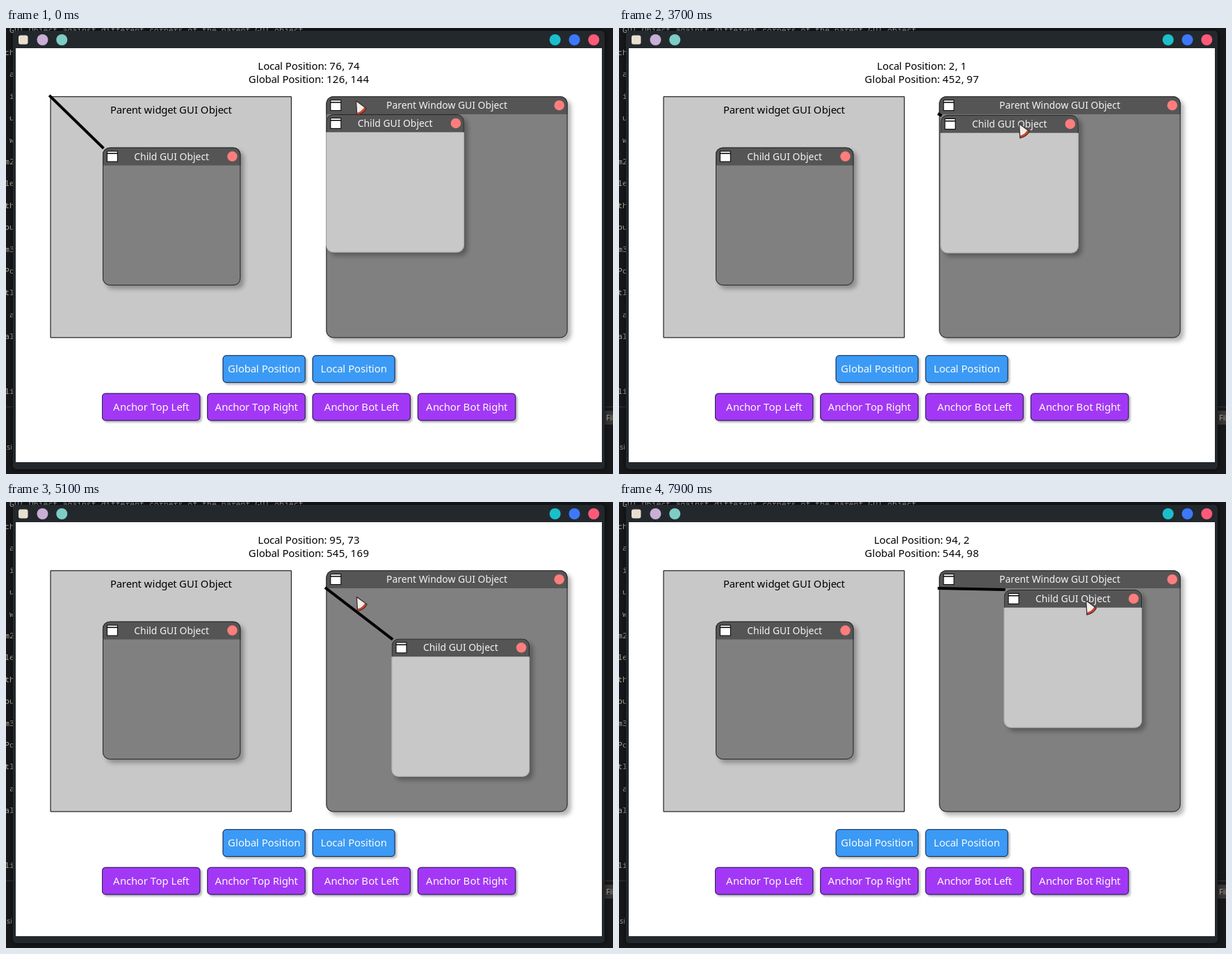
Write an HTML page with a canvas that moves like this. It is 873 px wide and 641 px high and loops after 8000 ms.

```html
<!DOCTYPE html>
<html lang="en">
<head>
<meta charset="utf-8">
<title>Local and global positions</title>
<style>
  html, body { margin: 0; width: 100%; height: 100%; overflow: hidden; background: #17191b; }
  canvas { display: block; }
</style>
</head>
<body>
<canvas id="stage" width="873" height="641"></canvas>
<script>
const ctx = document.getElementById('stage').getContext('2d');
const LOOP = 8000, STEP = 100;
const SCALE = 0.992, LEFT = 14, TOP = 28.8;   // app units to stage pixels
const SELECT = 2200;                          // the right child becomes the tracked one
const RESIZE_HOVER = 6500;                    // the pointer crosses the window edge
const DARK = '#242424', HEADER = '#555555', GRAY = '#808080', LIGHT = '#c8c8c8';
const SANS = '"Noto Sans", sans-serif', MONO = '"Noto Sans Mono", monospace';

const linear = (t, start, end) => Math.min(1, Math.max(0, (t - start) / (end - start)));
const ease = (t, start, end) => {
  const u = linear(t, start, end);
  return u * u * (3 - 2 * u);
};

// Two drags: diagonally into the window, then up along a slight bow.
function childAt(t) {
  const down = ease(t, 3600, 4800), up = ease(t, 7400, 7900);
  return [95 * down - up + 10 * Math.sin(Math.PI * up), 73 * down - 71 * up].map(Math.round);
}

// Free pointer moves: start, end, dx, dy, upward bow
const moves = [
  [0, 100, -9, -3, 0],
  [300, 900, 84, 35, 40],
  [1200, 1400, -5, 0, 0],
  [4750, 5200, -187, -76, 10],
  [6500, 7200, 211, 112, 0]
];

// The pointer sums its free moves, a turn around the window corner and the drags.
function pointerAt(t, [childX, childY]) {
  const from = Math.PI / 6, angle = from + linear(t, 5200, 6500) * Math.PI * 4 / 3;
  let x = 503 + childX * SCALE + 22 * (Math.cos(angle) - Math.cos(from));
  let y = 104 + childY * SCALE + 22 * (Math.sin(angle) - Math.sin(from));
  for (const [start, end, dx, dy, bow] of moves) {
    const p = ease(t, start, end);
    x += dx * p;
    y += dy * p - bow * Math.sin(Math.PI * linear(t, start, end));
  }
  return [x, y];
}

function rect(x, y, w, h, fill) {
  ctx.fillStyle = fill;
  ctx.fillRect(x, y, w, h);
}

function circle(x, y, r, fill) {
  ctx.fillStyle = fill;
  ctx.beginPath();
  ctx.arc(x, y, r, 0, 7);
  ctx.fill();
}

function rounded(x, y, w, h, radius, fill) {
  ctx.fillStyle = fill;
  ctx.beginPath();
  ctx.roundRect(x, y, w, h, radius);
  ctx.fill();
}

// One-pixel border just inside the box
function border(x, y, w, h, radius, stroke) {
  ctx.strokeStyle = stroke;
  ctx.lineWidth = 1;
  ctx.beginPath();
  ctx.roundRect(x + 0.5, y + 0.5, w - 1, h - 1, radius);
  ctx.stroke();
}

function text(str, x, y, size, fill, align = 'center', family = SANS) {
  ctx.font = `${size}px ${family}`;
  ctx.textAlign = align;
  ctx.fillStyle = fill;
  ctx.fillText(str, x, y);
}

// Centred text whose letters advance by whole pixels
function label(str, x, y, fill) {
  ctx.font = `15px ${SANS}`;
  const advance = char => Math.round(ctx.measureText(char).width);
  let pen = x - [...str].reduce((sum, char) => sum + advance(char), 0) / 2;
  for (const char of str) {
    text(char, pen, y, 15, fill, 'left');
    pen += advance(char);
  }
}

function withShadow(offset, blur, alpha, draw) {
  ctx.save();
  ctx.shadowColor = `rgba(0,0,0,${alpha})`;
  ctx.shadowOffsetX = ctx.shadowOffsetY = offset;
  ctx.shadowBlur = blur;
  draw();
  ctx.restore();
}

function drawDesktop() {
  rect(0, 0, 873, 641, '#17191b');
  text('GUI Object against different corners of the parent GUI object',
    5, 7, 11.55, '#b0b4b8', 'left', MONO);
  'ch a i u w m2 le th ou m3 Po tl a al'.split(' ').forEach((s, i) =>
    text(s, 11.9, 39 + i * 31.4, 11.55, '#b8b29c', 'right', MONO));
  text('li', 11.9, 526, 11.55, '#b8b29c', 'right', MONO);
  text('ssi', 9, 606, 11, '#a0a0a0', 'right');
  rect(0, 544, 873, 1, '#3a3a3a');
  rect(861, 550, 12, 20, '#3b3836');
  withShadow(0, 8, 0.7, () => rounded(10, 4, 851, 630, 5, '#23282d'));
  text('Fil', 863, 564, 11, '#a09a94', 'left');

  rounded(18, 10.5, 13.5, 13, 3, '#e9dfcf');
  ['#c9aed6', '#7ecdc4'].forEach((color, i) => circle(52.5 + i * 27.8, 17, 8, color));
  ['#1bbfcb', '#3d78fb', '#fe5a78'].forEach((color, i) => circle(789.7 + i * 27.8, 17, 8, color));
  rect(14, 29, 843, 595, '#ffffff');
}

function drawWindow(x, y, size, title, body, edge) {
  withShadow(5, 6, 0.3, () => rounded(x, y, size, size, 10, body));
  border(x, y, size, size, 10, edge);
  rounded(x, y, size, 26, [10, 10, 0, 0], HEADER);
  ctx.save();
  ctx.beginPath();
  ctx.rect(x, y, size, 26);
  ctx.clip();
  border(x, y, size, size, 10, DARK);
  ctx.restore();

  rect(x + 6, y + 5, 16, 16, '#000');
  rect(x + 7, y + 6, 14, 2, '#fff');
  rect(x + 7, y + 9.5, 14, 10.5, '#fff');
  text(title, x + size / 2, y + 18, 14, '#f4f4f4');
  circle(x + size - 12, y + 13, 7.3, '#ff7d7d');
}

function drawButton(caption, x, y, w, fill) {
  withShadow(2.5, 3, 0.28, () => rounded(x, y, w, 40, 5, fill));
  border(x, y, w, 40, 5, '#1c2440');
  label(caption, x + w / 2, y + 25.2, '#fafafa');
}

function drawLink(x0, y0, x1, y1) {
  ctx.save();
  ctx.strokeStyle = '#000';
  ctx.lineWidth = 4;
  ctx.lineCap = 'square';
  ctx.beginPath();
  ctx.moveTo(x0, y0);
  ctx.lineTo(x1 + 0.01, y1);   // keeps a zero-length link visible as a dot
  ctx.stroke();
  ctx.restore();
}

function drawApp(t, [childX, childY]) {
  const selected = t >= SELECT;
  const local = selected ? [childX, childY] : [76, 74];
  const origin = selected ? [450, 96] : [50, 70];
  const global = local.map((v, i) => v + origin[i]);

  ctx.save();
  ctx.translate(LEFT, TOP);
  ctx.scale(SCALE, SCALE);
  label(`Local Position: ${local.join(', ')}`, 425, 31, '#000');
  label(`Global Position: ${global.join(', ')}`, 425, 51, '#000');

  rect(50, 70, 350, 350, LIGHT);
  border(50, 70, 350, 350, 0, '#000');
  label('Parent widget GUI Object', 225, 95, '#000');
  if (!selected) drawLink(...origin, ...global);
  drawWindow(126, 144, 200, 'Child GUI Object', GRAY, DARK);

  drawWindow(450, 70, 350, 'Parent Window GUI Object', GRAY, DARK);
  if (selected) drawLink(...origin, ...global);
  drawWindow(450 + childX, 96 + childY, 200, 'Child GUI Object', LIGHT, '#b4b4b4');

  ['Global', 'Local'].forEach((kind, i) =>
    drawButton(kind + ' Position', 300 + i * 130, 445, 120, '#3b9af5'));
  ['Top Left', 'Top Right', 'Bot Left', 'Bot Right'].forEach((corner, i) =>
    drawButton('Anchor ' + corner, 125 + i * 152.5, 500, 142.5, '#a238f5'));
  ctx.restore();
}

function fillPath(path, fill) {
  ctx.fillStyle = fill;
  ctx.fill(path);
}

function drawPointer(x, y, resizing) {
  ctx.save();
  ctx.translate(x, y);
  ctx.lineJoin = 'round';
  ctx.lineWidth = 1.3;
  ctx.strokeStyle = '#3a3030';
  if (resizing) {
    const tip = new Path2D('M6 8.5L15.5 4.5L14.5 13.5Z');
    fillPath(tip, '#d8402f');
    ctx.stroke(tip);
    rounded(-4, -1, 6, 18.5, 1, '#f1eeea');
    border(-4, -1, 6, 18.5, 1, '#3a3030');
  } else {
    const wedge = new Path2D('M.5 .8L15.3 11.5Q11.5 19 1.8 21.2Z');
    fillPath(wedge, '#f1eeea');
    fillPath(new Path2D('M15.3 11.5Q11.5 19 1.8 21.2L1.6 18Q9 16 12.5 9.6Z'), '#d8402f');
    ctx.stroke(wedge);
  }
  ctx.restore();
}

function render(now) {
  const t = Math.floor(now % LOOP / STEP) * STEP;
  const child = childAt(t);
  drawDesktop();
  drawApp(t, child);
  drawPointer(...pointerAt(t, child), t === RESIZE_HOVER);
}

let start;
function tick(now) {
  start ??= now;
  render(now - start);
  requestAnimationFrame(tick);
}
render(0);
requestAnimationFrame(tick);
</script>
</body>
</html>
```
